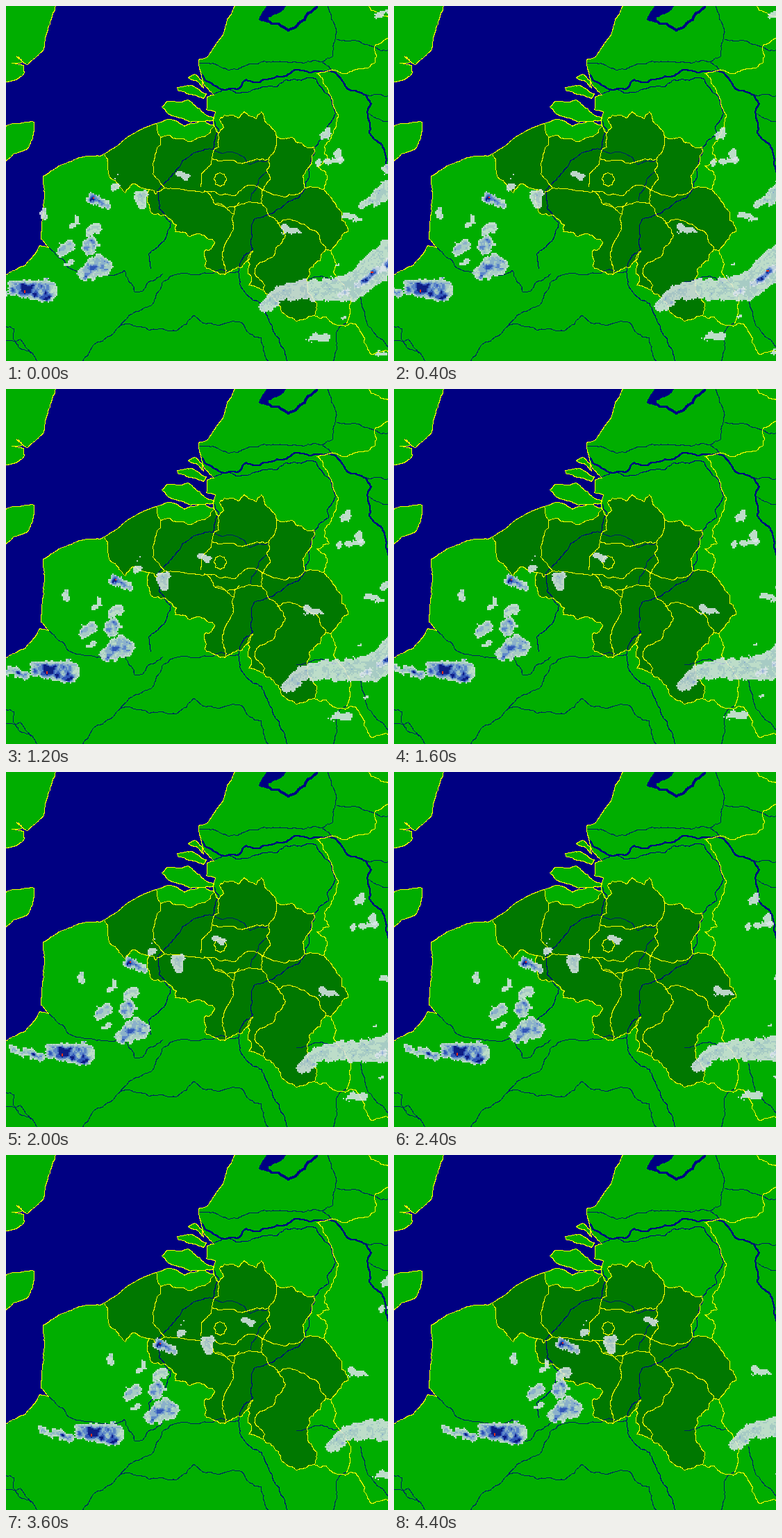
A matplotlib script that plays this animation: 550 px wide and 512 px high, repeating every 4800 ms.

```python
import numpy as np
import matplotlib.pyplot as plt
from matplotlib.animation import FuncAnimation

W, H, DPI = 550, 512, 100
FRAMES, STEP_MS = 12, 400
CELL = 2
LAND, DARK, SEA = "#00ae00", "#007800", "#000082"
YELLOW, NAVY, STREAM = (255, 255, 0), (0, 0, 130), (0, 36, 100)
RAIN = np.array([
    (222, 230, 236, 218), (190, 208, 224, 225), (150, 178, 218, 238),
    (96, 134, 208, 248), (50, 86, 184, 255), (14, 30, 134, 255),
    (226, 44, 24, 255)], dtype=np.uint8)

rng = np.random.default_rng(7)

fig = plt.figure(figsize=(W / DPI, H / DPI), dpi=DPI, facecolor=LAND)
ax = fig.add_axes([0, 0, 1, 1])
ax.axis("off")
ink = np.zeros((H, W, 4), np.uint8)


def ragged(*xy, k=0.1):
    """Path through key points, made uneven by midpoint displacement."""
    p = np.array(xy, float).reshape(-1, 2)
    for _ in range(4):
        d = np.diff(p, axis=0)
        side = np.stack([-d[:, 1], d[:, 0]], 1)
        shift = np.clip(rng.normal(0, k, (len(d), 1)), -2 * k, 2 * k)
        out = np.empty((2 * len(p) - 1, 2))
        out[::2] = p
        out[1::2] = p[:-1] + d / 2 + shift * side
        p = out
    return p


def stroke(p, color=YELLOW, px=1):
    """Set every pixel along the path, without smoothing."""
    run = np.r_[0, np.cumsum(np.hypot(*np.diff(p, axis=0).T))]
    s = np.arange(0, run[-1], 0.5)
    x = np.rint(np.interp(s, run, p[:, 0])).astype(int)
    y = np.rint(np.interp(s, run, p[:, 1])).astype(int)
    for i in range(px):
        for j in range(px):
            ok = (x + i >= 0) & (x + i < W) & (y + j >= 0) & (y + j < H)
            ink[y[ok] + j, x[ok] + i] = (*color, 255)


def fill(color, *parts):
    p = np.concatenate(parts)
    ax.fill(p[:, 0], p[:, 1], color=color, lw=0, antialiased=False, zorder=1)


def stream(*xy):
    stroke(ragged(*xy, k=0.08), STREAM)


def river(*xy, px=1):
    stroke(ragged(*xy, k=0.08), NAVY, px)


# Coasts
thames = ragged(71, -1, 57, 42, 54, 62, 31, 84, 15, 72, 24, 80, 8, 82, 25, 85,
                26, 96, 14, 106, -1, 109, k=0.06)
kent = ragged(-1, 173, 10, 169, 40, 167, 38, 191, 30, 206, 10, 213, -1, 224, k=0.05)
channel = ragged(-1, 388, 27, 374, 48, 345, 61, 348, 50, 335, 52, 303, 53, 245,
                 76, 230, 135, 216, 141, 213, k=0.04)
beach = ragged(141, 213, 175, 188, 195, 177, 216, 169, k=0.02)
delta = ragged(216, 169, 233, 163, 256, 173, 285, 166, 299, 172, 301, 152, 288, 149,
               290, 130, 299, 128, 285, 113, 280, 97, k=0.06)
dunes = ragged(280, 97, 277, 77, 288, 74, 312, 41, 329, -1, k=0.03)
isles = [ragged(224, 145, 232, 137, 262, 135, 283, 153, 298, 160, 297, 165, 263, 166,
                232, 154, 224, 145, k=0.06),
         ragged(246, 117, 266, 114, 288, 126, 284, 133, 248, 122, 246, 117, k=0.06),
         ragged(262, 103, 272, 98, 282, 108, 284, 118, 262, 103, k=0.06)]

# Outer border of the dark country
north = ragged(216, 169, 222, 189, 235, 186, 262, 195, 288, 186, 299, 172, 305, 184,
               313, 175, 307, 163, 314, 157, 335, 161, 342, 152, 360, 162, 367, 152,
               376, 170, 389, 188, 412, 189, 425, 197, 443, 203)
east = ragged(443, 203, 437, 230, 430, 262, 457, 264, 464, 272, 477, 291, 492, 325,
              478, 338, 467, 352, 460, 350)
southeast = ragged(460, 350, 437, 378, 433, 395, 447, 428, 443, 446)
south = ragged(443, 446, 408, 449, 392, 427, 370, 409, 349, 402, 348, 379, 355, 353,
               340, 376, 315, 387, 288, 378, 288, 351, 300, 340, 285, 330, 243, 325,
               245, 315, 228, 301, 209, 298, 206, 264, 185, 256, 171, 269, 150, 248,
               146, 225, 141, 213)

fill(SEA, thames, kent, channel, beach, delta, dunes)
for isle in isles:
    fill(LAND, isle)
fill(DARK, beach, north, east, southeast, south)

# Lake, rivers and streams
fill(SEA, ragged(376, -1, 402, -1, 376, 16, 378, 23, 364, 19, 372, 5, k=0.05))
river(374, 20, 405, 34, 421, 23, 446, 0, px=3)
river(280, 97, 312, 120, 337, 116, 345, 105, 378, 104, 402, 100, 415, 91, 470, 94,
      512, 125, 525, 140, 519, 152, 522, 180, 541, 200, 546, 228, 550, 240, px=2)
river(285, 121, 298, 128, 312, 120, 390, 116, 402, 106, 447, 106, 474, 155, 464, 185,
      444, 203, 430, 262, 403, 284, 358, 306, 355, 350, 334, 384, 340, 408, 362, 425,
      385, 470, 405, 512)
river(300, 166, 306, 178, 298, 206, 254, 222, 218, 265, 220, 291, 237, 312, 232, 325,
      205, 357, 208, 378)
stream(278, 82, 320, 92, 350, 83, 400, 80, 455, 80)
stream(463, 0, 475, 35, 470, 72, 455, 80, 470, 94)
stream(476, 48, 505, 50, 540, 64, 550, 62)
stream(512, 126, 550, 129)
stream(523, 155, 550, 166)
stream(298, 206, 350, 228, 376, 223)
stream(376, 238, 353, 270, 352, 280)
stream(60, 347, 110, 383, 150, 388, 170, 381, 185, 412, 196, 411, 225, 386)
stream(110, 512, 150, 475, 212, 428, 235, 390, 335, 382)
stream(165, 460, 205, 467, 245, 468, 270, 446, 305, 460, 340, 457, 377, 512)
stream(0, 462, 11, 465, 18, 492, 44, 512)
stream(0, 482, 20, 480, 35, 500)
stream(418, 397, 450, 390, 480, 394)
stream(510, 420, 517, 450, 550, 492)
stream(490, 457, 475, 470, 470, 512)

# Yellow borders
for line in [thames, kent, channel, beach, delta, dunes, *isles,
             north, east, southeast, south]:
    stroke(line)
for points in [
        (222, 189, 216, 210, 228, 262),
        (207, 264, 215, 271, 228, 262, 300, 267, 355, 258, 368, 264, 430, 262),
        (305, 184, 296, 220, 345, 225, 378, 220, 389, 188),
        (296, 220, 282, 240, 280, 260),
        (378, 220, 380, 250, 368, 266),
        (285, 266, 300, 285, 368, 284, 368, 264),
        (300, 285, 328, 300, 325, 325, 311, 365, 315, 387),
        (328, 300, 335, 283),
        (368, 284, 378, 302, 402, 330, 386, 358, 365, 369, 360, 390, 370, 409),
        (390, 313, 425, 314, 447, 325, 460, 350),
        (522, 0, 525, 6, 550, 14),
        (550, 45, 530, 58, 530, 82, 490, 97, 447, 97, 468, 130, 477, 155, 475, 172,
         459, 200, 465, 222, 447, 230, 462, 245, 457, 264),
        (467, 352, 471, 383, 496, 420, 490, 457),
        (443, 446, 474, 459, 503, 458, 525, 502, 550, 498)]:
    stroke(ragged(*points))
turn = np.linspace(0, 2 * np.pi, 9)
stroke(ragged(*np.stack([308 + 9 * np.cos(turn), 250 + 10 * np.sin(turn)], 1).ravel()))
ax.imshow(ink, interpolation="nearest", aspect="auto", zorder=2)


def noise(shape, blur):
    a = rng.normal(size=shape)
    for axis in (0, 1):
        for _ in range(blur):
            a = (np.roll(a, 1, axis) + 2 * a + np.roll(a, -1, axis)) / 4
    return a / a.std()


def wind(x, y):
    """Drift in pixels per frame."""
    vx = 10.7 - 3 * x / W * max(0, 1 - y / 300)
    vy = -0.15 - max(0, y - 180) / 160 * (0.45 + x / 900)
    return vx, vy


clouds = []


def cloud(heat, r0, r1, *spine, hot=None):
    """Rain along a spine whose radius runs from r0 to r1."""
    key = np.array(spine, float).reshape(-1, 2)
    t = np.linspace(0, len(key) - 1, 40)
    sx, sy = (np.interp(t, range(len(key)), c) for c in key.T)
    r = np.linspace(r0, r1, 40)
    pad = max(r0, r1) + 6
    x0, y0 = int(sx.min() - pad), int(sy.min() - pad)
    x, y = np.meshgrid(np.arange(x0, sx.max() + pad, CELL) + 1,
                       np.arange(y0, sy.max() + pad, CELL) + 1)
    dist = np.hypot(x[..., None] - sx, y[..., None] - sy)
    depth = (r - dist).max(-1) + 1.6 * noise(x.shape, 3) + 0.5 * noise(x.shape, 0)
    level = heat * np.clip(depth / 6, 0, 1) * (1 + 0.4 * noise(x.shape, 3))
    level += 0.05 * noise(x.shape, 0) + 0.04
    if hot:
        near = np.hypot(x - hot[0], y - hot[1])
        level += 0.6 * np.exp(-(near / 6) ** 2)
    index = np.clip(level * 6, 0, 5).astype(int)
    if hot:
        index[near < 2] = 6
    rgba = RAIN[index]
    rgba[depth < 0, 3] = 0
    art = ax.imshow(rgba, interpolation="nearest", aspect="auto", zorder=4)
    h, w = depth.shape
    clouds.append((art, x0, y0, w * CELL, h * CELL, *wind(*key.mean(0))))


# Western showers
cloud(0.45, 5, 8, -44, 405, -6, 413)
cloud(0.45, 12, 18, 14, 408, 57, 411, hot=(27, 412))
cloud(0.45, 13, 16, 117, 384, 136, 375)
cloud(0.3, 8, 9, 79, 353, 90, 346)
cloud(0.38, 9, 10, 120, 349, 122, 343)
cloud(0.38, 7, 7, 120, 322, 131, 320)
cloud(0.3, 4, 4, 97, 315, 102, 309)
cloud(0.3, 5, 5, 55, 298, 57, 303)
cloud(0.1, 4, 3, 89, 373, 96, 369)
cloud(0.38, 7, 7, 124, 277, 143, 286, hot=(126, 277))
cloud(0.15, 5, 5, 154, 264, 158, 261)
cloud(0, 3, 3, 159, 248, 161, 243)
cloud(0.16, 10, 6, 194, 275, 196, 287)
cloud(0, 4, 4, 246, 242, 259, 245)

# Eastern band with its wetter core, then stray showers
cloud(0.12, 8, 23, 372, 433, 400, 413, 448, 410, 500, 406, 552, 360)
cloud(0.45, 1, 7, 478, 418, 505, 404, 552, 370, hot=(527, 384))
cloud(0.02, 5, 4, 456, 188, 464, 182)
cloud(0.03, 4, 5, 450, 227, 480, 223)
cloud(0.03, 5, 3, 478, 214, 480, 222)
cloud(0, 3, 3, 488, 303, 509, 307)
cloud(0.18, 4, 15, 514, 288, 550, 266)
cloud(0.1, 5, 5, 549, 233, 550, 238)
cloud(0.03, 5, 4, 401, 321, 424, 326)
cloud(0, 3, 3, 477, 374, 479, 374)
cloud(0, 3, 3, 485, 448, 490, 448)
cloud(0.02, 5, 4, 438, 480, 464, 477)
cloud(0, 5, 4, 535, 16, 547, 8)
cloud(0, 3, 3, 532, 503, 549, 501)

ax.set_xlim(-0.5, W - 0.5)
ax.set_ylim(H - 0.5, -0.5)


def update(i):
    for art, x, y, w, h, vx, vy in clouds:
        left = x + round(vx * i) - 0.5
        top = y + round(vy * i) - 0.5
        art.set_extent((left, left + w, top + h, top))
    return [c[0] for c in clouds]


anim = FuncAnimation(fig, update, frames=FRAMES, interval=STEP_MS,
                     repeat=True, repeat_delay=0, blit=False)
plt.show()
```
